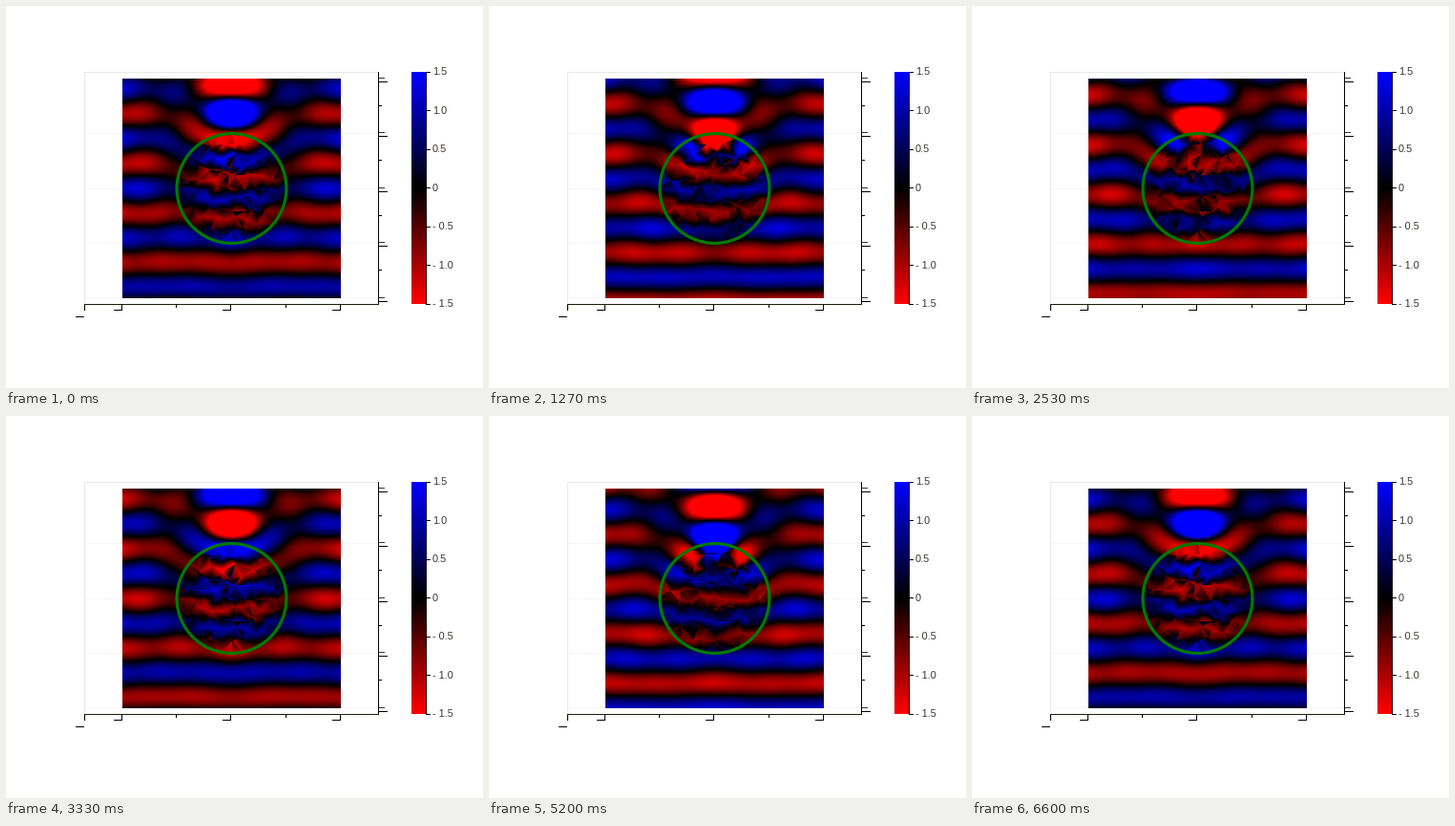
These frames come from a looping animation (500 px wide and 400 px high, 6670 ms). A matplotlib script:

```python
import numpy as np
import matplotlib.pyplot as plt
from matplotlib.animation import FuncAnimation
from matplotlib.colors import LinearSegmentedColormap
from matplotlib.patches import Circle, Rectangle
from matplotlib.tri import Triangulation
from numpy.polynomial.legendre import leggauss, legvander

# Plane wave travelling upwards past a penetrable unit sphere
FRAMES, LOOP_MS = 100, 6670
K_OUT, K_IN = 7.0, 8.9
ORDERS = 18
CX, CY, UNIT = 236.5, 191.0, 57.4
LEFT, RIGHT, TOP, BOTTOM = 122, 351, 76, 306

order = np.arange(ORDERS + 2)
low = order[:-1]
weight = (2 * low + 1) * 1j ** low


def sph_j(x):
    """Spherical Bessel functions of every order, one row per x."""
    t, w = leggauss(48)
    waves = np.exp(1j * np.outer(x, t)) * w
    return (waves @ legvander(t, ORDERS + 1) / (2 * 1j ** order)).real


def sph_h(x):
    """Outgoing spherical Hankel functions of every order."""
    x = np.atleast_1d(x)
    y = [-np.cos(x) / x, -np.cos(x) / x**2 - np.sin(x) / x]
    for n in order[1:-1]:
        y.append((2 * n + 1) / x * y[n] - y[n - 1])
    return sph_j(x) + 1j * np.array(y).T


def slope(f, x):
    """x times the derivative, for all orders but the last."""
    return low * f[:-1] - x * f[1:]


def coefficients():
    j, h, ji = sph_j([K_OUT])[0], sph_h(K_OUT)[0], sph_j([K_IN])[0]
    dj, dh, di = slope(j, K_OUT), slope(h, K_OUT), slope(ji, K_IN)
    j, h, ji = j[:-1], h[:-1], ji[:-1]
    den = dh * ji - di * h
    return (di * j - dj * ji) / den, (dh * j - dj * h) / den


SCATTER, INNER = coefficients()


def outer_field(x, s):
    r = np.hypot(x, s)
    radial = SCATTER * sph_h(K_OUT * r)[:, :-1]
    scattered = (radial * weight * legvander(s / r, ORDERS)).sum(axis=1)
    return np.exp(1j * K_OUT * s) + scattered


def inner_field(x, s):
    r = np.hypot(x, s)
    radial = INNER * sph_j(K_IN * np.minimum(r, 1))[:, :-1]
    cosine = s / np.maximum(r, 1e-9)
    return (radial * weight * legvander(cosine, ORDERS)).sum(axis=1)


def coarse_mesh(rng, step=0.22):
    gx, gy = np.meshgrid(np.arange(-6, 7), np.arange(-6, 7))
    x = (gx + 0.5 * (gy % 2)) * step
    y = gy * step * 0.866
    pts = np.column_stack([x.ravel(), y.ravel()])
    pts = pts + rng.uniform(-0.07, 0.07, pts.shape)
    pts = pts[np.hypot(*pts.T) < 0.9]
    a = np.linspace(0, 2 * np.pi, 28, endpoint=False)
    ring = 1.03 * np.column_stack([np.cos(a), np.sin(a)])
    return np.vstack([pts, ring])


def faceted_field(x, s):
    """Inner field, linear on each ragged facet of a coarse mesh."""
    rng = np.random.default_rng(12)
    pts = coarse_mesh(rng)
    tri = Triangulation(*pts.T)
    corners = pts[tri.triangles]
    seen = corners + rng.normal(0, 0.04, corners.shape)
    values = inner_field(seen[..., 0].ravel(), seen[..., 1].ravel())
    values = values.reshape(-1, 3)

    cell = tri.get_trifinder()(x, s)
    a, b, c = corners[cell].transpose(1, 2, 0)
    p = np.array([x, s])

    def cross(u, v):
        return u[0] * v[1] - u[1] * v[0]

    area = cross(b - a, c - a)
    wb = cross(p - a, c - a) / area
    wc = cross(b - a, p - a) / area
    va, vb, vc = values[cell].T
    return va * (1 - wb - wc) + vb * wb + vc * wc


def build_field():
    px, py = np.meshgrid(np.arange(LEFT, RIGHT) + 0.5,
                         np.arange(TOP, BOTTOM) + 0.5)
    x, s = (px - CX) / UNIT, (CY - py) / UNIT
    inside = np.hypot(x, s) < 1
    field = np.empty(x.shape, complex)
    field[~inside] = outer_field(x[~inside], s[~inside])
    field[inside] = faceted_field(x[inside], s[inside])
    return field


fig = plt.figure(figsize=(5, 4), dpi=100, facecolor="white")
ax = fig.add_axes([0, 0, 1, 1])
ax.axis("off")
cmap = LinearSegmentedColormap.from_list("wave", ["red", "black", "blue"], 512)


def bar(x, y, w, h, color="black"):
    ax.add_patch(Rectangle((x, y), w, h, color=color, lw=0, antialiased=False))


def draw_axes():
    for y in (133, 191, 248, 305):
        bar(82, y, 308, 1, "#f5f5f5")
    bar(82, 69, 308, 1, "#e8e8e8")
    bar(82, 69, 1, 244, "#e8e8e8")
    bar(390, 69, 1, 244)
    bar(82, 312, 309, 1, "#1c1f0c")
    for y in (76, 133, 191, 248, 306):
        bar(391, y - 1, 6, 1, "#333333")
        bar(391, y + 3, 9, 1)
    for y in (105, 162, 220, 277):
        bar(391, y - 1, 3, 1)
    bar(82, 313, 1, 6)
    bar(73, 325, 9, 1)
    for x in (122, 236, 351):
        bar(x - 1, 313, 1, 6)
        bar(x - 9, 318, 9, 1)
    for x in (179, 294):
        bar(x - 1, 313, 1, 3)


def draw_colorbar():
    ramp = np.linspace(1.5, -1.5, 243)[:, None]
    ax.imshow(ramp, cmap=cmap, vmin=-1.5, vmax=1.5, aspect="auto",
              extent=(425, 440, 312, 69), interpolation="nearest")
    bar(440, 69, 1, 244)
    for i in range(7):
        value, y = 1.5 - 0.5 * i, 69 + 40.5 * i
        label = "0" if value == 0 else f"{abs(value):.1f}"
        if value < 0:
            label = "- " + label
        bar(440, int(y), 5, 1)
        ax.text(447, y + 3.2, label, family="Liberation Sans",
                size=11 * 0.72, color="#3a3632", va="baseline")


field = build_field()
draw_axes()
draw_colorbar()
image = ax.imshow(field.real, cmap=cmap, vmin=-1.5, vmax=1.5, aspect="auto",
                  extent=(LEFT, RIGHT, BOTTOM, TOP), interpolation="nearest",
                  zorder=3)
ax.add_patch(Circle((CX, CY), UNIT, fill=False, ec="#007a00", lw=3.2 * 0.72,
                    zorder=5))
ax.set_xlim(0, 500)
ax.set_ylim(400, 0)


def update(i):
    phase = 2 * np.pi * i / (FRAMES - 1)
    image.set_data((field * np.exp(-1j * phase)).real)
    return [image]


anim = FuncAnimation(fig, update, frames=FRAMES, interval=LOOP_MS / FRAMES,
                     repeat=True, repeat_delay=0, blit=False)
plt.show()
```
